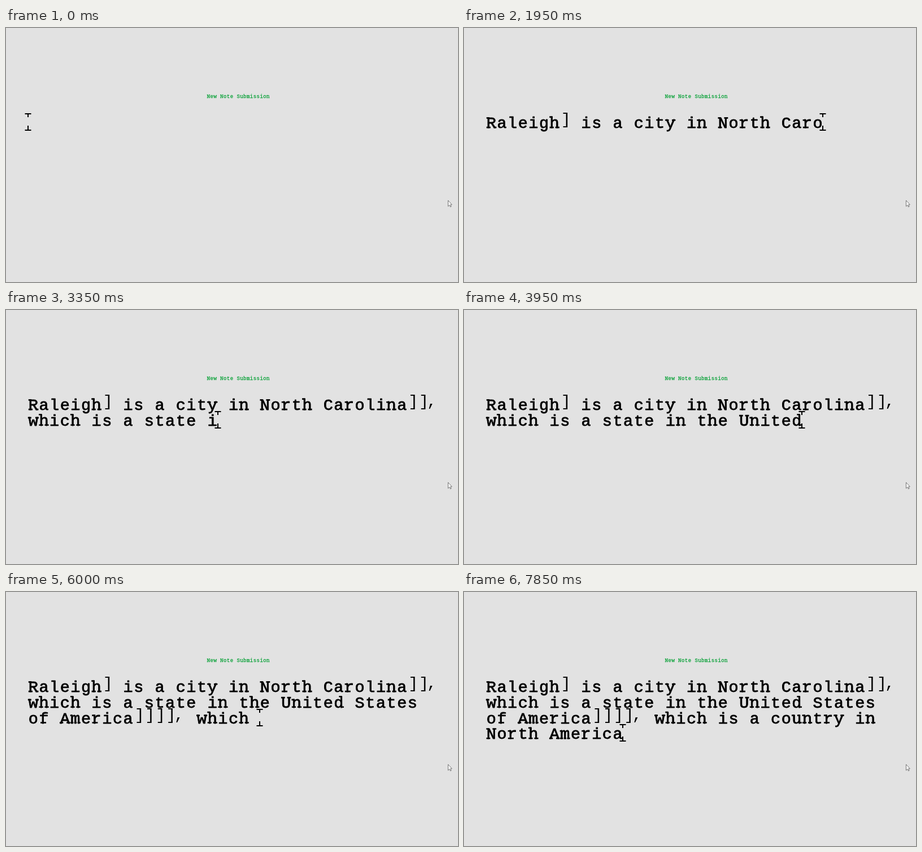
Recreate the animation shown at these times as an HTML page with a canvas. Size 800 by 450 pixels, loop 8 s.

```html
<!DOCTYPE html>
<html lang="en">
<head>
<meta charset="utf-8">
<title>New Note Submission</title>
<style>
  html, body { margin: 0; width: 100%; height: 100%; overflow: hidden; background: #e2e2e2; }
  canvas { display: block; }
</style>
</head>
<body>
<canvas id="stage" width="800" height="450"></canvas>
<script>
const ctx = document.getElementById('stage').getContext('2d');
const LOOP = 8000, TICK = 50, COLUMNS = 39;
const PITCH = 18.64, LEFT = 39, BASELINE = 177.2, LINE_HEIGHT = 27.7;
const FONT = '28.5px "Liberation Mono", monospace';
const NOTE = 'Raleigh] is a city in North Carolina]], which is a state in the United States ' +
  'of America]]]], which is a country in North America';

// Typing bursts: start time, characters then, end time, characters then
const BURSTS = [
  [50, 1, 850, 9], [900, 10, 1100, 15], [1150, 16, 1700, 28], [1800, 29, 2250, 38],
  [2500, 39, 2850, 46], [2900, 47, 3300, 57], [3350, 58, 3750, 69], [3950, 70, 3950, 70],
  [4200, 71, 4950, 88], [5100, 89, 5250, 92], [5750, 93, 6550, 114], [6600, 115, 6650, 116],
  [7050, 117, 7450, 122], [7600, 123, 7850, 129],
];

// Typewriter slabs: x in the cell, level, half length
const LEVELS = { base: 1.1, x: 14, cap: 17.8, top: 19.6 };
const SLABS = {
  h: [[4.4, 'base', 3.6], [14.4, 'base', 3.6], [3, 'top', 2.6]],
  n: [[4.4, 'base', 3.6], [14.4, 'base', 3.6], [3, 'x', 2.6]],
  m: [[3.2, 'base', 2.6], [9.4, 'base', 2.2], [15.6, 'base', 2.6], [2, 'x', 1.8]],
  u: [[2.8, 'x', 2.4], [12.8, 'x', 2.4], [15.8, 'base', 2.4]],
  r: [[6.6, 'base', 5], [4.4, 'x', 3]],
  f: [[8.4, 'base', 5]],
  d: [[12.4, 'top', 2.6], [16, 'base', 2.4]],
  w: [[2.8, 'x', 3], [15.9, 'x', 3]],
  y: [[3.4, 'x', 3.2], [15.3, 'x', 3.2]],
  R: [[4.4, 'base', 3.6], [3.4, 'cap', 2.6], [16, 'base', 2.4]],
  N: [[4, 'base', 3.4], [3, 'cap', 2.6], [14.8, 'cap', 3.4]],
  U: [[4, 'cap', 3.4], [14.6, 'cap', 3.4]],
  A: [[3.2, 'base', 3.2], [15.4, 'base', 3.2]],
};

function typedCount(time) {
  let count = 0;
  for (const [t0, n0, t1, n1] of BURSTS) {
    if (time < t0) break;
    const p = t1 > t0 ? Math.min(1, (time - t0) / (t1 - t0)) : 1;
    count = Math.round(n0 + (n1 - n0) * p);
  }
  return count;
}

function wrap(text) {
  const lines = [''];
  for (const word of text.split(/(?<= )/)) {
    if (lines.at(-1).length + word.trimEnd().length > COLUMNS) lines.push('');
    lines[lines.length - 1] += word;
  }
  if (lines.at(-1).length > COLUMNS) lines.push('');
  return lines;
}

// Brackets and commas are lighter and sit higher than the letters
function drawMark(char, x) {
  const box = ctx.measureText(char);
  const centre = (box.actualBoundingBoxRight - box.actualBoundingBoxLeft) / 2;
  ctx.fillText(char, x + (char === ']' ? 9.8 : 4.2) - centre, -7);
}

function drawLetter(char, x) {
  const inset = (PITCH - ctx.measureText(char).width) / 2;
  ctx.lineWidth = 0.8;
  ctx.fillText(char, x + inset, 0);
  ctx.strokeText(char, x + inset, 0);
  ctx.lineWidth = 2.6;
  ctx.beginPath();
  for (const [slabX, level, half] of SLABS[char] || []) {
    ctx.moveTo(x + slabX - half, -LEVELS[level]);
    ctx.lineTo(x + slabX + half, -LEVELS[level]);
  }
  ctx.stroke();
}

function drawText(text, x, y, color, scale = 1) {
  ctx.save();
  ctx.translate(x, y);
  ctx.scale(scale, scale);
  ctx.font = FONT;
  ctx.fillStyle = ctx.strokeStyle = color;
  ctx.lineJoin = 'round';
  [...text].forEach((char, i) => {
    if (char !== ' ') (/[\],]/.test(char) ? drawMark : drawLetter)(char, i * PITCH);
  });
  ctx.restore();
}

function drawCaret(x, y) {
  ctx.strokeStyle = '#000';
  ctx.lineWidth = 2;
  ctx.beginPath();
  for (const [bar, stem] of [[-25, -19], [4, -4]]) {
    ctx.moveTo(x - 5.5, y + bar);
    ctx.lineTo(x + 5.5, y + bar);
    ctx.moveTo(x, y + bar);
    ctx.lineTo(x, y + stem);
  }
  ctx.stroke();
}

function drawPointer() {
  const arrow = new Path2D('M782.5 305.5V316L785 313.7L786.5 317L788 316.3L786.6 313H789.3Z');
  ctx.fillStyle = '#fff';
  ctx.strokeStyle = '#555';
  ctx.lineWidth = 0.8;
  ctx.fill(arrow);
  ctx.stroke(arrow);
}

function draw(now) {
  const time = Math.floor(now % LOOP / TICK) * TICK;
  const lines = wrap(NOTE.slice(0, typedCount(time)));
  const lineY = row => BASELINE + row * LINE_HEIGHT;
  const last = lines.length - 1;

  ctx.fillStyle = '#e2e2e2';
  ctx.fillRect(0, 0, 800, 450);
  drawText('New Note Submission', 355.5, 124, '#05a035', 0.314);
  lines.forEach((line, row) => drawText(line, LEFT, lineY(row), '#000'));
  drawCaret(Math.round(LEFT + lines[last].length * PITCH), Math.round(lineY(last)));
  drawPointer();
  requestAnimationFrame(draw);
}
requestAnimationFrame(draw);
</script>
</body>
</html>
```
